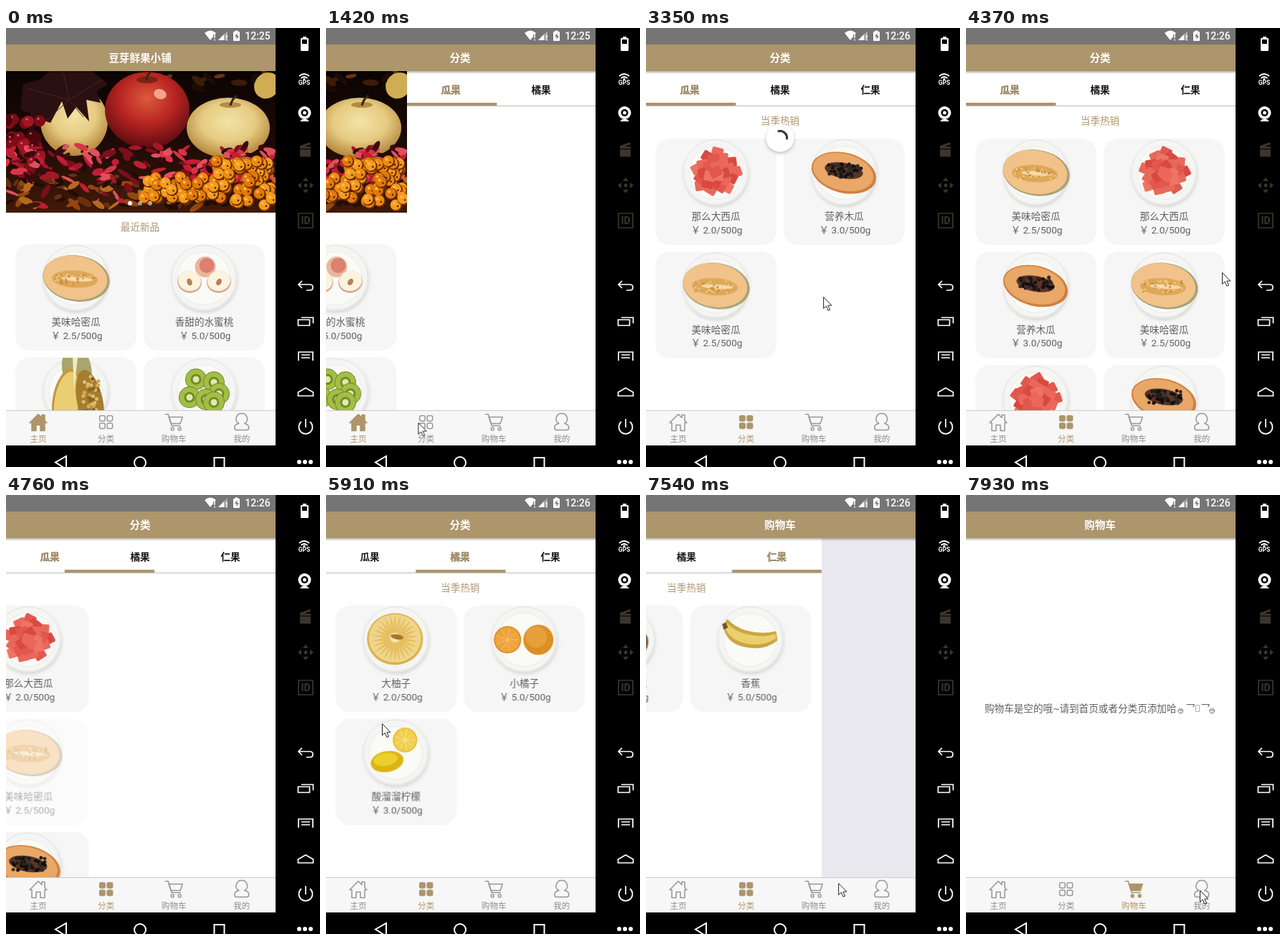
Recreate the animation shown at these times as an HTML page. Size 438x611 px, loop 8 s.

```html
<!DOCTYPE html>
<html lang="zh-CN">
<head>
<meta charset="utf-8">
<title>水果小铺</title>
<style>
html, body { margin: 0; width: 100%; height: 100%; overflow: hidden; background: #000; }
svg { display: block; width: 438px; height: 611px; }
text { font: 13.6px Roboto, "Noto Sans CJK SC", "Noto Sans CJK", sans-serif; fill: #606060; text-anchor: middle; }
.title { font-size: 14.6px; font-weight: 700; fill: #fff; }
.clock { font-size: 14px; font-weight: 500; fill: #fff; }
.heading { fill: #ad956c; }
.toptab { font-weight: 700; fill: #151515; }
.toptab.on { fill: #ad956c; }
.label { font-size: 11.6px; fill: #8e8e8e; }
.on .label { fill: #ad956c; }
.icon { fill: none; stroke: #979797; stroke-width: 1.5; stroke-linejoin: round; stroke-linecap: round; }
.on .icon { fill: #ad956c; stroke: #ad956c; }
.on .wire { fill: none; }
.line { fill: none; stroke: #fff; stroke-width: 1.7; }
.thick { stroke-width: 2; }
.dim { fill: #3b352c; }
</style>
</head>
<body>
<script>
const TAN = '#ad956c', UNLOADED = '#e8e8ee';
let seed = 7;
const rand = (lo = 0, hi = 1) => {
  seed = (seed * 16807) % 2147483647;
  return lo + (hi - lo) * seed / 2147483647;
};
const pick = list => list[Math.floor(rand(0, list.length))];
const many = (count, draw) => Array.from({ length: count }, (_, i) => draw(i)).join('');
const circle = (x, y, r, fill, extra = '') => `<circle cx="${x}" cy="${y}" r="${r}" fill="${fill}" ${extra}/>`;
const oval = (x, y, rx, ry, fill, turn = 0) =>
  `<ellipse rx="${rx}" ry="${ry}" fill="${fill}" transform="translate(${x} ${y}) rotate(${turn})"/>`;
const rect = (x, y, w, h, fill, extra = '') =>
  `<rect x="${x}" y="${y}" width="${w}" height="${h}" fill="${fill}" ${extra}/>`;
const path = (d, extra = '') => `<path d="${d}" ${extra}/>`;
const text = (x, y, value, cls = '') => `<text x="${x}" y="${y}" class="${cls}">${value}</text>`;
const group = (id, content) => `<g id="${id}">${content}</g>`;
const clipped = (clip, content) => `<g clip-path="url(#${clip})">${content}</g>`;
const at = (x, y, content) => `<g transform="translate(${x} ${y})">${content}</g>`;

// Fruit, centred on its plate
const slice = (x, y, r, rind, flesh, core) => circle(x, y, r, rind) + circle(x, y, r * .92, flesh) +
  many(9, i => {
    const a = i * Math.PI / 4.5;
    return path(`M${x} ${y}l${r * .85 * Math.cos(a)} ${r * .85 * Math.sin(a)}`, `stroke="${core}" opacity=".7"`);
  });
const kiwi = (x, y) => circle(x, y, 15, '#7f7f3a') + circle(x, y, 14, '#a0c043') +
  circle(x, y, 7.5, '#718a2c') + circle(x, y, 4.5, '#e3e8ad');
const fruits = {
  melon: () => oval(1, 1, 47, 32, '#a8a277', 9) + oval(-.5, 0, 45, 30.5, '#f1c28a', 9) +
    oval(-1, 2, 32, 12, '#dfa758', 3) + oval(2, 2, 22, 3, '#f4dcae', 3) +
    many(36, () => oval(rand(-29, 27), rand(-6, 10), 2, 1, pick(['#f0cd88', '#c48a3b']), rand(0, 180))),
  watermelon: () => many(26, i => {
    const a = i * 2.4, r = 29 * Math.sqrt((25 - i) / 26);
    return rect(-8, -7, 16, 14, pick(['#e2584e', '#ee7465', '#d9493f', '#e9685b']), `rx="2" transform="translate(${r * Math.cos(a)} ${r * Math.sin(a)}) rotate(${rand(-40, 40)})"`);
  }),
  papaya: () => oval(0, 1, 46, 28, '#d0813f', 14) + oval(-1, 0, 43, 25.5, '#e9a768', 14) + oval(0, -2, 27, 11, '#5a3526', 10) +
    many(50, () => circle(rand(-23, 24), rand(-11, 7), 2.4, pick(['#191615', '#302a27', '#0f0d0c']))),
  peach: () => circle(2, -15, 14.5, '#eab79d') + circle(4, -17, 10.5, '#dc8070') +
    [-20, 21].map((x, i) => oval(x, 6, 17, 15, '#dba68e', i ? -12 : 12) + oval(x, 4.500, 16, 14, '#faf3df', i ? -12 : 12) + oval(x, 6, 3.5, 5, '#b58058', i ? 30 : -20)).join(''),
  pineapple: () => path('M-18-46h36q8 20 2 32h-34q-8-16-4-32z', 'fill="#a9a56b"') +
    oval(-11, 12, 21, 44, '#c29a42', 10) + oval(-12, 13, 17, 40, '#ebcd74', 10) + oval(20, 14, 18, 44, '#a67c31', -12) +
    path('M-4-46l2 44 5-44z', 'fill="#f0eac6"') +
    many(45, () => circle(rand(10, 32), rand(-20, 40), 2.5, pick(['#d3ab4c', '#84652c', '#dfc067']))),
  kiwi: () => [[-11, -16], [14, -12], [21, 4], [-20, 9], [3, 12], [14, 16]].map(p => kiwi(...p)).join(''),
  pomelo: () => oval(-1, 0, 39, 36, '#dcb044') + oval(-1, -1, 36.500, 33.500, '#efd58c') +
    many(13, i => oval(-1, -1, 2, 31, '#e6c060', i * 14)) + circle(-1, -2, 7, '#f4e3ae') + oval(2, -3, 9, 3.5, '#a8752f', 10),
  orange: () => slice(-23, 1, 19, '#db861c', '#eda33b', '#f7cf8b') + circle(20, 1, 21, '#dd8f24') + circle(17, -3, 15, '#e5a03b'),
  lemon: () => slice(13, -17, 17, '#e4b51f', '#f0cf4f', '#fff0a6') + oval(-12, 13, 23, 14.5, '#dcb512', -10) + oval(-14, 10, 17, 9, '#ecd02c', -10),
  banana: () => path('M-38-19q4 25 30 30 28 6 46-9l-2-13q-20 5-42-1-16-5-26-16z', 'fill="#c9a640"') +
    path('M-36-17q8 20 34 24 22 3 38-8l-1-6q-20 6-44-1-15-5-23-14z', 'fill="#ead06b"') + path('M-39-21l5-2 3 7-6 3z', 'fill="#6d5423"'),
  brown: () => circle(-14, 5, 19, '#8d7656') + circle(17, 4, 20, '#7d664a') + kiwi(-14, 5)
};
const plate = fruit => circle(1, 3, 46, '#d8d8d6', 'filter="url(#soft)"') + circle(0, 0, 46, '#f5f5f3') +
  circle(0, 0, 45, 'none', 'stroke="#e2e2df"') + circle(0, 1, 37, '#fafaf6', 'stroke="#ececea"') + fruits[fruit]();

const goods = {
  melon: ['美味哈密瓜', '2.5'], watermelon: ['那么大西瓜', '2.0'], papaya: ['营养木瓜', '3.0'],
  peach: ['香甜的水蜜桃', '5.0'], pineapple: ['新鲜菠萝', '4.0'], kiwi: ['猕猴桃', '5.0'],
  pomelo: ['大柚子', '2.0'], orange: ['小橘子', '5.0'], lemon: ['酸溜溜柠檬', '3.0'],
  banana: ['香蕉', '5.0'], brown: ['酸甜猕猴桃', '4.0']
};
// Two-column shelf; every plate gets an id so that it can load late
const shelf = (name, top, list) => list.map((fruit, i) => {
  const [label, price] = goods[fruit];
  return at(13 + i % 2 * 179, top + (i >> 1) * 157.5, group(`${name}-${i}`,
    rect(0, 0, 169, 148, '#f6f6f6', 'rx="20"') + group(`${name}-${i}-pic`, at(84, 46.5, plate(fruit))) +
    text(84.5, 113, label) + text(85.5, 131.5, `￥ ${price}/500g`)));
}).join('');

const leaves = (count, xs, ys, colors) => many(count, () =>
  oval(rand(...xs), rand(...ys), rand(5, 12), rand(2, 5), pick(colors), rand(-60, 60)));
const berries = (count, xs, ys) => many(count, () => {
  const x = rand(...xs), y = rand(...ys);
  return circle(x + 1, y + 1, 8.500, '#6b2c06') + circle(x, y, 7.500, pick(['#ee8a10', '#e27a08', '#f59c1e'])) +
    circle(x - 2, y - 2, 2, '#fbbd55') + circle(x + 3, y + 2, 1.2, '#3d1a06');
});
const reds = ['#c21d35', '#d83447', '#7d0e1c', '#a51728', '#e0505c'];
const browns = ['#6a2f0e', '#3d1908', '#94470f', '#220d05', '#b56a1e'];
const banner = () => rect(0, 60, 376, 197, 'url(#night)') +
  leaves(14, [215, 376], [62, 92], ['#3d1c08', '#6b3210', '#1d0c05']) + oval(364, 80, 17, 19, '#d0ad55', 40) +
  oval(95, 130, 47, 48, 'url(#gold)') + oval(197, 114, 59, 53, 'url(#ruby)') + oval(197, 72, 15, 5, '#7a2415') + oval(215, 92, 9, 7, '#f3a58c', 20) +
  oval(310, 139, 58, 42, 'url(#gold)') + oval(313, 107, 15, 4, '#b08d44') +
  path('M196 73q0-7 5-11M313 108q2-9 9-14', 'stroke="#3a2513" stroke-width="3" fill="none"') +
  path('M24 78l24-6 12-12h60l22 18-16 10 6 16-20-4 4 30-18-20-12 16-8-24-16 30-12-4-18 20 2-30-14-4z', 'fill="#2a1011"') +
  path('M88 100l-8-38M88 100l46-28M88 100L30 84M88 100l-42 38M88 100l20 24', 'stroke="#4d2222"') +
  leaves(90, [0, 376], [210, 250], browns) + leaves(30, [0, 200], [205, 248], [...browns, ...reds]) +
  many(34, () => { const x = rand(0, 50), y = rand(125, 198); return circle(x, y, 8, pick(['#7d0c18', '#a01424', '#4d060d'])) + circle(x - 2, y - 3, 1.5, '#d8606c'); }) +
  leaves(150, [0, 376], [165, 212], [...reds, '#3a0a10', '#24080a']) +
  berries(48, [190, 300], [206, 238]) + berries(48, [285, 372], [184, 228]) + berries(8, [310, 372], [228, 248]) +
  [173, 187, 201].map((x, i) => circle(x, 244, 3, '#fff', `opacity="${i ? .55 : .9}"`)).join('');

// Bottom bar icons drawn around 0,0
const icons = [
  path('M-12 1L0-11 5-6v-4h4v8l3 3H9v11H3V4h-6v8h-6V1z', 'class="icon"'),
  [[-9, -9], [1.5, -9], [-9, 1.5], [1.5, 1.5]].map(([x, y]) => `<rect x="${x}" y="${y}" width="7.5" height="7.5" rx="2" class="icon"/>`).join(''),
  path('M-12-11h4l5 16H9', 'class="icon wire"') + path('M-7-7h19L9 2H-4z', 'class="icon"') +
    [-2, 8].map(x => circle(x, 9.5, 2, 'none', 'class="icon"')).join(''),
  path('M0-12a7.500 7.500 0 0 1 4 14q6 1 6 6 0 3-3 3H-7q-3 0-3-3 0-5 6-6a7.500 7.500 0 0 1 4-14z', 'class="icon"')
];
const bottomTabs = ['主页', '分类', '购物车', '我的'].map((label, i) => {
  const cell = text(0, 27, label, 'label') + icons[i];
  return at(45 + i * 94.6, 548.5, group(`off${i}`, cell) + (i < 3 ? `<g id="on${i}" class="on">${cell}</g>` : ''));
}).join('');
const topTabs = ['瓜果', '橘果', '仁果'].map((label, i) =>
  text(61 + i * 126, 91, label, 'toptab') + group(`top${i}`, text(61 + i * 126, 91, label, 'toptab on'))).join('');

const statusBar = rect(0, 0, 376, 23, '#757575') +
  path('M277 7q8-7 16 0l-8 10z', 'fill="#fff"') + path('M291 9v5M291 15v2', 'stroke="#757575" stroke-width="4"') +
  path('M291 9v5M291 15.500v2', 'stroke="#fff" stroke-width="1.500"') +
  path('M309 4v13h-13z', 'fill="#aaa"') + path('M304 9v8h-8z', 'fill="#fff"') + path('M308 10v4M308 15.500v2', 'stroke="#fff" stroke-width="1.500"') +
  rect(317, 5, 9, 13, '#fff', 'rx="1"') + rect(319.5, 3.5, 4, 2, '#fff') + path('M322.500 7l-3.500 5h2.500v4l3.500-5h-2.500z', 'fill="#757575"') +
  group('clock0', text(351, 16, '12:25', 'clock')) + group('clock1', text(351, 16, '12:26', 'clock'));

const device = rect(376, 0, 62, 611, '#000') + rect(0, 581, 376, 30, '#000') +
  path('M84 596v18l-15-9.500zM290.500 598h14v14h-14z', 'class="line thick"') + circle(187, 605, 8, 'none', 'class="line thick"') +
  rect(411, 14, 11, 18, '#fff', 'rx="1"') + rect(414, 12, 5, 3, '#fff') + rect(413, 16, 7, 6, '#000') +
  path('M409 67q7-6 14 0M411.500 70q4.500-4 9 0', 'class="line"') + circle(416, 71, 1.5, '#fff') +
  '<text x="416" y="79" style="font:700 8.500px Roboto,sans-serif;fill:#fff">GPS</text>' +
  circle(416.5, 118, 9, '#fff') + circle(416.5, 118, 5, '#000') + circle(416.5, 118, 2.5, '#fff') + path('M410 130l3-3h7l3 3z', 'fill="#fff"') +
  rect(410, 169, 15, 10, '#3b352c') + path('M410 164l14-5 1 3-14 5zM410 165h15v3h-15z', 'class="dim"') +
  [0, 90, 180, 270].map(a => path('M0-11l4 5h-8z', `class="dim" transform="translate(418 219) rotate(${a})"`)).join('') + circle(418, 219, 2.5, '#3b352c') +
  path('M408 258h20v20h-20z', 'class="line" style="stroke:#3b352c"') +
  '<text x="418" y="273" style="font:700 14px Roboto,sans-serif;fill:#3b352c">ID</text>' +
  path('M413 352l-5 5 5 5M408 357h16q4 0 4 4t-4 4h-5M407.500 406h16v8h-16zM412 403h16.500v8M408 463v-12h20v12M412 455h12M412 459h12M407.500 512v-5l10.500-6 10.500 6v5z', 'class="line"') +
  path('M412 548a9.500 9.500 0 1 0 12 0M418 544v12', 'class="line"') + [409, 417, 425].map(x => circle(x, 604, 3, '#fff')).join('');

const spinner = group('refreshing', group('refresh',
  circle(0, 2, 19.5, '#bbb', 'filter="url(#soft)"') + circle(0, 0, 19.5, '#fff') +
  group('arc', path('M-3.300-9A9.600 9.600 0 0 1 9.400 2', 'fill="none" stroke="#333" stroke-width="3"'))));
const subpage = (id, content) => group(id, text(187, 134, '当季热销', 'heading') + content);

const homePage = rect(0, 60, 376, 472, '#fff') + clipped('bannerClip', banner()) + text(187, 282, '最近新品', 'heading') +
  shelf('home', 301, ['melon', 'peach', 'pineapple', 'kiwi']);
const categoryPage = rect(0, 60, 376, 472, UNLOADED) + group('category', rect(0, 60, 376, 472, '#fff') +
  clipped('shelfClip', group('subpages',
    subpage('shelfA', group('old', shelf('old', 154, ['watermelon', 'papaya', 'melon'])) +
      group('new', shelf('new', 154, ['melon', 'watermelon', 'papaya', 'melon', 'watermelon', 'papaya']))) +
    at(376, 0, subpage('shelfB', shelf('citrus', 154, ['pomelo', 'orange', 'lemon']))) +
    at(752, 0, subpage('shelfC', shelf('pome', 154, ['brown', 'banana'])))) + spinner) +
  topTabs + rect(0, 108, 376, 1, '#bdbdbd') + group('indicator', rect(0, 104, 125.3, 4, TAN)));
const cartPage = rect(0, 60, 376, 472, UNLOADED) + group('cart', rect(0, 60, 376, 472, '#fff') +
  '<text x="26" y="302" style="text-anchor:start">购物车是空的哦~请到首页或者分类页添加哈</text>' + text(313, 302, '乛') + text(334, 302, '乛') +
  [301, 345].map(x => path(`M${x} 299a1.500 1.500 0 1 1-1.500-1.500q3 0 3 2.500a3.300 3.300 0 1 1-5-2.500`, 'fill="none" stroke="#666"')).join('') +
  path('M320.500 292.500h5v9h-5z', 'fill="none" stroke="#999" stroke-width=".8"'));

const stops = (...colors) => colors.map((c, i) => `<stop offset="${i / (colors.length - 1)}" stop-color="${c}"/>`).join('');
const clip = (id, top, height) => `<clipPath id="${id}">${rect(0, top, 376, height, '#000')}</clipPath>`;
const scene = `<svg viewBox="0 0 438 611"><defs>
  <filter id="soft" x="-20%" y="-20%" width="140%" height="140%"><feGaussianBlur stdDeviation="2"/></filter>
  <radialGradient id="gold" cx=".5" cy=".4" r=".65">${stops('#f3e3a6', '#e6cb82', '#a8772c')}</radialGradient>
  <radialGradient id="ruby" cx=".5" cy=".35" r=".65">${stops('#dc5a3e', '#b92522', '#5e0c10')}</radialGradient>
  <linearGradient id="night" x2="0" y2="1">${stops('#0b0403', '#1c0a06', '#401a08')}</linearGradient>
  <linearGradient id="shade" x2="0" y2="1"><stop stop-opacity=".3"/><stop offset="1" stop-opacity="0"/></linearGradient>
  ${clip('pageClip', 60, 472) + clip('shelfClip', 109, 423) + clip('bannerClip', 60, 197)}</defs>
  ${clipped('pageClip', group('pages', homePage + at(376, 0, clipped('pageClip', categoryPage)) + at(752, 0, cartPage)))}
  ${rect(0, 60, 376, 4, 'url(#shade)') + rect(0, 23, 376, 37, TAN)}
  ${['豆芽鲜果小铺', '分类', '购物车'].map((t, i) => group(`title${i}`, text(187, 46.5, t, 'title'))).join('')}
  ${statusBar + rect(0, 532, 376, 49, '#f7f7f7') + rect(0, 532, 376, 1, '#ccc') + bottomTabs + device}
  ${group('cursor', group('pointer', path('M.500.500V16.500l3.700-3.500 2.700 6.200 2.600-1.100-2.700-6h5z', 'fill="#fff" stroke="#222"')))}</svg>`;

// Timeline: each track is a CSS keyframe rule over one loop, times in ms
const LOOP = 8000;
let css = '';
const track = (id, prop, ease, keys) => {
  const frames = [...keys, [LOOP, keys[keys.length - 1][1]]].map(([ms, v]) => `${ms * 100 / LOOP}%{${prop}:${v}}`).join('');
  css += `@keyframes ${id}{${frames}}#${id}{animation:${id} ${LOOP}ms ${ease} infinite}`;
};
const move = (id, keys) => track(id, 'transform', 'linear', keys.map(([ms, x, y = 0]) => [ms, `translate(${x}px,${y}px)`]));
const turn = (id, keys) => track(id, 'transform', 'linear', keys.map(([ms, deg]) => [ms, `rotate(${deg}deg)`]));
const fade = (id, keys) => track(id, 'opacity', 'step-end', keys);
const show = (id, from, to = LOOP) => {
  const keys = from > 0 ? [[0, 0], [from, 1]] : [[0, 1]];
  if (to < LOOP) keys.push([to, 0]);
  fade(id, keys);
};
// Shows name0, name1, … one after the other
const relay = (name, starts) => starts.forEach((ms, i) => show(name + i, ms, starts[i + 1]));

move('pages', [[0, 0], [1335, 0], [1340, -129], [1420, -262], [1500, -340], [1580, -376],
  [7535, -376], [7540, -505], [7620, -638], [7700, -716], [7780, -752]]);
const swipe = [[0, 0], [4440, 0], [4600, .22], [4690, .47], [4760, .65], [4840, .84], [4920, .95], [5020, .995],
  [5910, .995], [5990, 1.35], [6070, 1.72], [6150, 1.92], [6250, 2]];
move('subpages', swipe.map(([ms, p]) => [ms, -376 * p]));
move('indicator', swipe.map(([ms, p]) => [ms, 125.3 * p]));
move('refresh', [[0, 187, 85], [2400, 187, 85], [2900, 187, 168], [3050, 187, 153]]);
turn('arc', [[0, -200], [3050, -200], [3350, 0], [3560, 140]]);
move('cursor', [[0, 276, 424], [70, 276, 424], [260, 147, 226], [410, 147, 226], [870, 125, 551], [1700, 130, 548],
  [1950, 170, 305], [2110, 185, 200], [2400, 185, 190], [2970, 243, 378], [3350, 247, 374], [3820, 300, 360], [4100, 357, 340],
  [4420, 357, 340], [4760, 110, 340], [5200, 200, 340], [5530, 275, 330], [5670, 345, 330], [5820, 310, 330], [5910, 78, 318],
  [6460, 64, 330], [6610, 64, 330], [6800, 205, 335], [6950, 240, 510], [7080, 240, 559], [7460, 240, 559], [7540, 268, 540], [7930, 326, 550]]);
fade('pointer', [[0, 0], [70, 1], [4690, 0], [5200, 1]]);

relay('title', [0, 1340, 7540]);
relay('on', [0, 1500, 7700]);
relay('top', [0, 4840, 6070]);
relay('clock', [0, 3050]);
show('off0', 1500);
fade('off1', [[0, 1], [1500, 0], [7700, 1]]);
show('off2', 0, 7700);
show('category', 1420);
show('shelfA', 1500);
show('old', 0, 3560);
show('old-0-pic', 1660);
show('old-2-pic', 1740);
show('old-1-pic', 2180);
show('refreshing', 0, 3560);
show('new', 3560);
fade('new-3', [[0, 1], [4690, .5]]);
show('shelfB', 5020);
[5590, 5590, 5670].forEach((ms, i) => show(`citrus-${i}-pic`, ms));
show('shelfC', 6250);
show('pome-0-pic', 6610);
show('pome-1-pic', 6690);
show('cart', 7620);

document.body.innerHTML = `<style>${css}</style>${scene}`;
</script>
</body>
</html>
```
